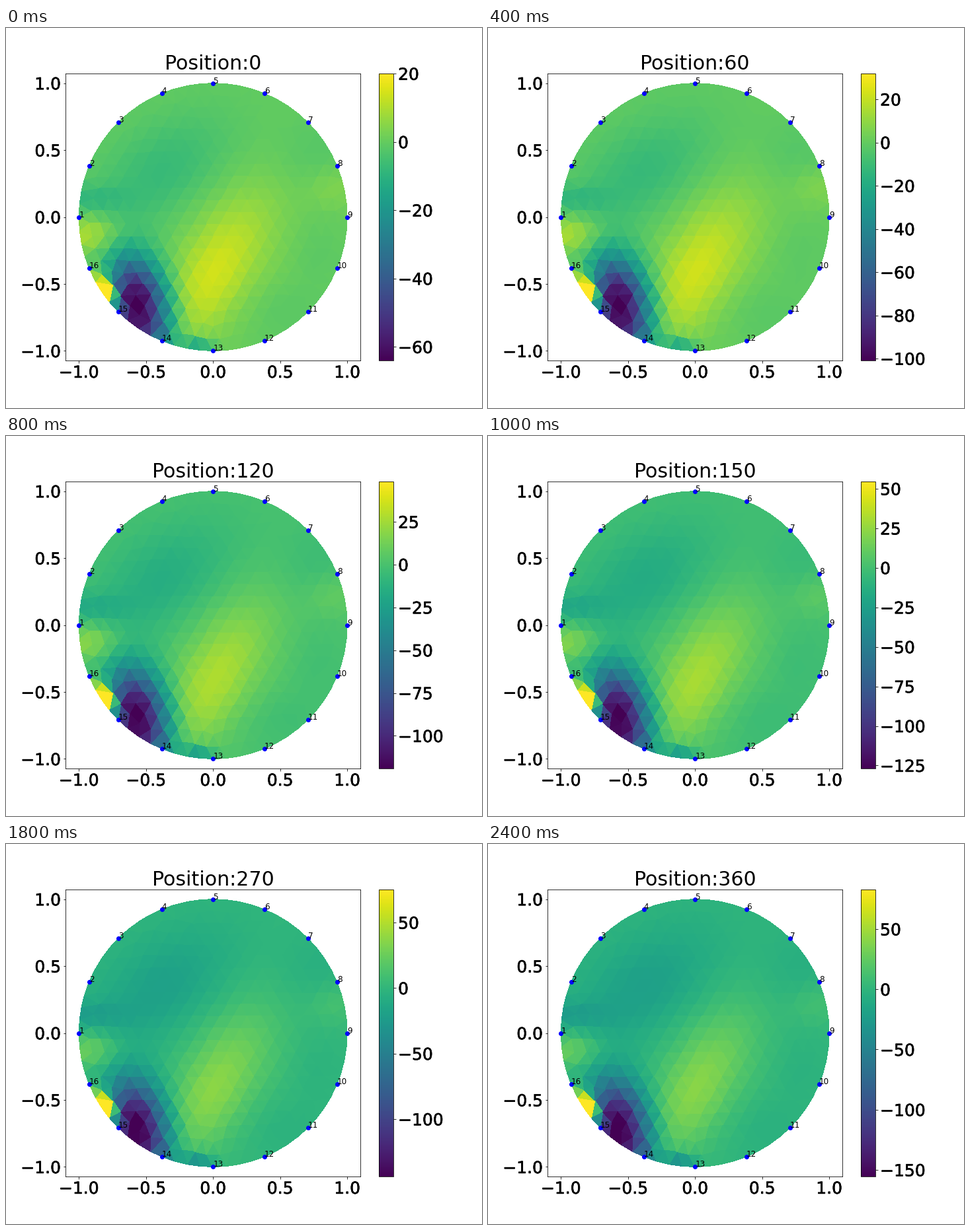
Write a matplotlib script that moves like this. It is 720 px wide and 576 px high and loops after 2500 ms.

```python
import numpy as np
import matplotlib.pyplot as plt
import matplotlib.patheffects as pe
from matplotlib.animation import FuncAnimation
from matplotlib.tri import Triangulation

FRAMES, N_EL = 25, 16
ANGLES = np.pi - 2 * np.pi * np.arange(N_EL) / N_EL
ELECTRODES = np.column_stack([np.cos(ANGLES), np.sin(ANGLES)])

# Colour range over time: step, lowest and highest value
STEPS = [0, 4, 6, 10, 14, 18, 24]
LOWS = [-64, -100.9, -111.3, -126.9, -136.1, -143.8, -155.5]
HIGHS = [20, 31.9, 42.4, 54.5, 65.2, 75.1, 82.8]


def triangulate(p, eps):
    tri = Triangulation(p[:, 0], p[:, 1]).triangles
    mid = p[tri].mean(axis=1)
    return Triangulation(p[:, 0], p[:, 1], tri[np.hypot(*mid.T) < 1 - eps])


def disc_mesh(h=0.1, steps=120):
    """Spring-relaxed triangle mesh of the unit disc with fixed electrodes."""
    x, y = np.meshgrid(np.arange(-1, 1 + h, h),
                       np.arange(-1, 1 + h, h * np.sqrt(3) / 2))
    x[1::2] += h / 2
    p = np.column_stack([x.ravel(), y.ravel()])
    p = p[np.hypot(*p.T) < 1 + 0.1 * h]
    gap = np.linalg.norm(p[:, None] - ELECTRODES, axis=2).min(axis=1)
    p = np.vstack([ELECTRODES, p[gap > h / 2]])
    old = np.full_like(p, np.inf)
    for i in range(steps):
        if np.linalg.norm(p - old, axis=1).max() > 0.1 * h:
            old = p.copy()
            bars = triangulate(p, 0.1 * h).edges
        vec = p[bars[:, 0]] - p[bars[:, 1]]
        length = np.linalg.norm(vec, axis=1)
        rest = 1.2 * np.sqrt(np.mean(length ** 2))
        if i % 30 == 29 and np.any(rest > 2 * length):
            close = np.unique(bars[rest > 2 * length])
            p = np.delete(p, close[close >= N_EL], axis=0)
            old = np.full_like(p, np.inf)
            continue
        force = (np.maximum(rest - length, 0) / length)[:, None] * vec
        move = np.zeros_like(p)
        np.add.at(move, bars[:, 0], force)
        np.add.at(move, bars[:, 1], -force)
        move[:N_EL] = 0
        p = p + 0.2 * move
        p /= np.maximum(np.hypot(*p.T), 1)[:, None]
    return triangulate(p, 0.1 * h)


mesh = disc_mesh()
X = mesh.x[mesh.triangles].mean(axis=1)
Y = mesh.y[mesh.triangles].mean(axis=1)


def bump(cx, cy, sx, sy, deg=0):
    a = np.radians(deg)
    dx, dy = X - cx, Y - cy
    u = (dx * np.cos(a) + dy * np.sin(a)) / sx
    v = (dy * np.cos(a) - dx * np.sin(a)) / sy
    return np.exp(-(u * u + v * v) / 2)


BASE = (0.145 * bump(-0.03, -0.48, 0.42, 0.19, 60)
        + 0.04 * bump(0.2, -0.12, 0.4, 0.3, 45)
        + 0.13 * bump(-0.92, -0.13, 0.16, 0.09)
        - 0.09 * bump(-0.38, 0.34, 0.4, 0.24, 35)
        - 0.08 * bump(-0.95, 0.14, 0.2, 0.07)
        - 0.18 * bump(-0.11, -0.96, 0.08, 0.05)
        - 0.03 * bump(0.75, 0.45, 0.2, 0.2)
        + 0.05 * bump(0.9, 0.22, 0.13, 0.11)
        - 0.02 * bump(0.75, -0.25, 0.15, 0.2)
        - 0.02 * bump(0.5, -0.7, 0.2, 0.15))
SPIKE = bump(-0.8, -0.54, 0.085, 0.045, -55)


def sink(cy):
    dy = Y - cy
    dx = X + 0.568 + 0.15 * dy
    sx = np.where(dx < 0, 0.13, 0.16)
    sy = np.where(dy > 0, 0.24, 0.33)
    return np.exp(-((dx / sx) ** 2 + (dy / sy) ** 2) / 2)


def field(k):
    lo, hi = np.interp(k, STEPS, LOWS), np.interp(k, STEPS, HIGHS)
    span = hi - lo
    zero = -lo / span
    drift = (0.762 - zero) / 0.11
    shape = (BASE - (zero + 0.04) * sink(-0.648 - 0.06 * drift)
             + (1.26 - zero) * SPIKE)
    return np.clip(shape * span, lo, hi), lo, hi


fig, ax = plt.subplots(figsize=(10, 8), dpi=72)
fig.subplots_adjust(left=0.125, right=0.9, bottom=0.125, top=0.88)
values, low, high = field(0)
mosaic = ax.tripcolor(mesh, facecolors=values, cmap="viridis",
                      vmin=low, vmax=high)
bar = fig.colorbar(mosaic, ax=ax)
ax.plot(*ELECTRODES.T, "bo", markersize=6)
for n, (ex, ey) in enumerate(ELECTRODES, 1):
    ax.text(ex, ey, str(n), fontsize=12)

ax.set_xlim(-1.1, 1.1)
ax.set_ylim(-1.0716, 1.0716)
ticks = np.arange(-1, 1.1, 0.5)
ax.set_xticks(ticks)
ax.set_yticks(ticks)
ax.tick_params(labelsize=25)
bar.ax.tick_params(labelsize=25)
title = ax.set_title("", fontsize=30)
HEAVY = [pe.withStroke(linewidth=0.6, foreground="black")]


def thicken(labels):
    for label in labels:
        label.set_path_effects(HEAVY)


thicken(ax.get_xticklabels() + ax.get_yticklabels())


def draw(k):
    values, low, high = field(k)
    mosaic.set_array(values)
    mosaic.set_clim(low, high)
    thicken(bar.ax.get_yticklabels())
    title.set_text(f"Position:{15 * k}")
    return mosaic, title


anim = FuncAnimation(fig, draw, frames=FRAMES, interval=100, repeat=True)
plt.show()
```
